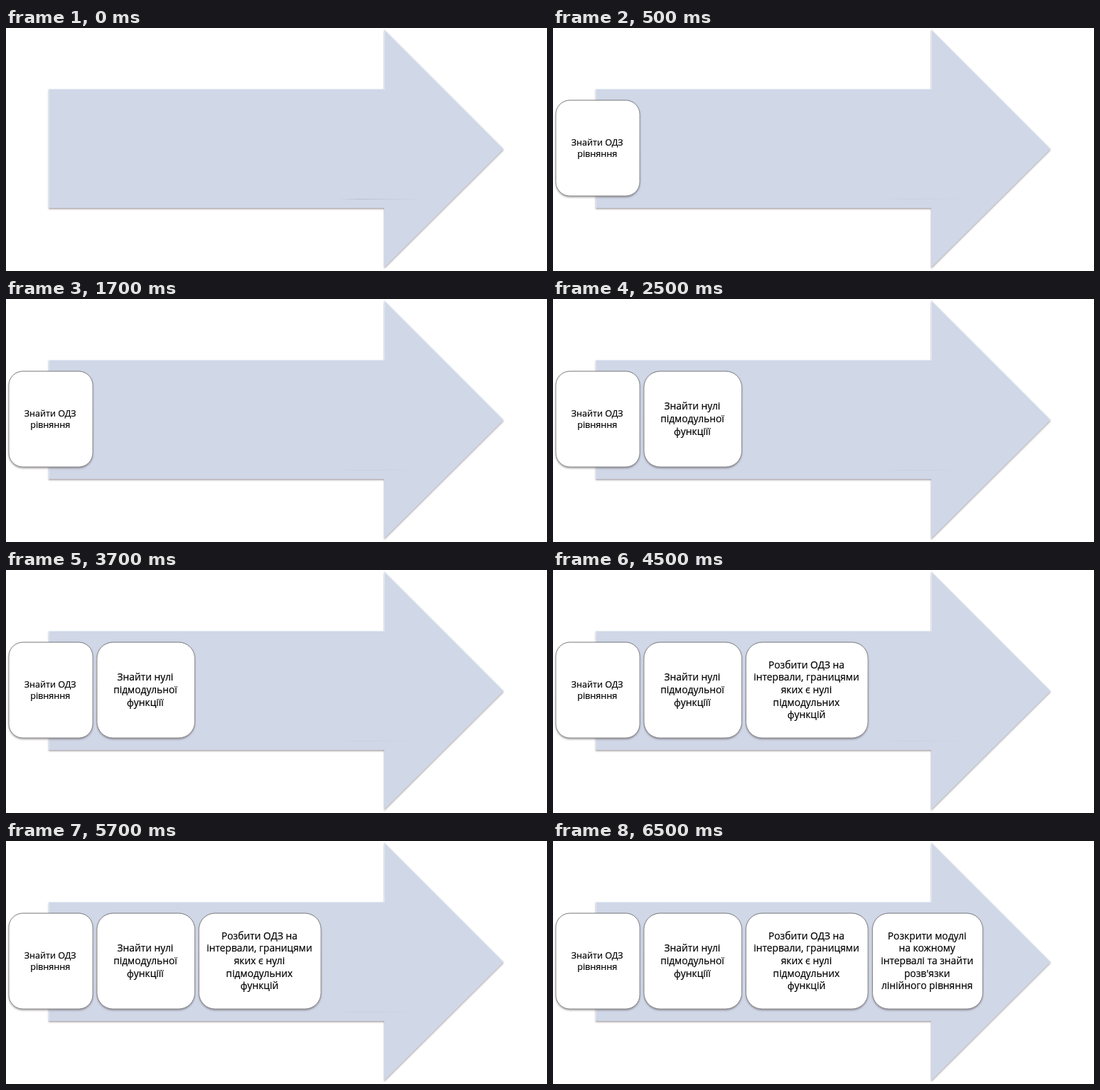
An HTML page that plays this animation: 761x343 px, repeating every 8 s.

```html
<!DOCTYPE html>
<html lang="uk">
<head>
<meta charset="utf-8">
<style>
  html, body { margin: 0; width: 100%; height: 100%; overflow: hidden; background: #fff; }
  svg { display: block; width: 761px; height: 343px; }
  text {
    font-family: "Open Sans", "Noto Sans", sans-serif; text-anchor: middle;
    fill: #000; stroke: #000; stroke-width: .2px;
  }
</style>
</head>
<body>
<svg id="stage" viewBox="0 0 761 343">
  <defs>
    <filter id="soft" x="-10%" y="-10%" width="120%" height="120%">
      <feDropShadow dx="0" dy="1.6" stdDeviation="1" flood-color="#50404c" flood-opacity=".5"/>
    </filter>
    <linearGradient id="rim" x2="0" y2="1">
      <stop stop-color="#6c6c6c"/>
      <stop offset=".2" stop-color="#909090"/>
      <stop offset="1" stop-color="#808080"/>
    </linearGradient>
    <linearGradient id="hair" gradientUnits="userSpaceOnUse" x1="468" x2="586">
      <stop stop-color="#b9bfcc" stop-opacity="0"/>
      <stop offset=".25" stop-color="#b9bfcc"/>
      <stop offset="1" stop-color="#b9bfcc" stop-opacity="0"/>
    </linearGradient>
  </defs>
  <path d="M60 86H532V2L700 170.5L532 338V254H60Z" fill="#d0d7e7" filter="url(#soft)"/>
  <path d="M60.5 253V86.5H532.5V3L699 170" fill="none" stroke="#dde8f1"/>
  <rect id="crease" x="468" y="241" width="118" height="1" fill="url(#hair)"/>
</svg>
<script>
const LOOP = 8000, TOP = 102, HEIGHT = 135;
const stage = document.getElementById("stage");
const crease = document.getElementById("crease");

const cards = [
  { at: 500, x: 4, w: 118, size: 12.6, step: 16.2, lines: ["Знайти ОДЗ", "рівняння"] },
  { at: 2500, x: 128, w: 137.5, lines: ["Знайти нулі", "підмодульної", "функціїї"] },
  { at: 4500, x: 271.5, w: 171.5,
    lines: ["Розбити ОДЗ на", "інтервали, границями", "яких є нулі", "підмодульних", "функцій"] },
  { at: 6500, x: 449.5, w: 155,
    lines: ["Розкрити модулі", "на кожному", "інтервалі та знайти", "розв'язки", "лінійного рівняння"] }
];

function add(parent, tag, attrs) {
  const el = document.createElementNS("http://www.w3.org/2000/svg", tag);
  for (const key in attrs) el.setAttribute(key, attrs[key]);
  return parent.appendChild(el);
}

for (const card of cards) {
  const { x, w, lines, size = 13.8, step = 17.7 } = card;
  card.el = add(stage, "g", {});
  add(card.el, "rect", {
    x, y: TOP, width: w, height: HEIGHT, rx: Math.min(w, HEIGHT) / 6,
    fill: "#fff", stroke: "url(#rim)", "stroke-width": 0.9, filter: "url(#soft)"
  });
  const first = 174 - (lines.length - 1) / 2 * step;
  lines.forEach((line, i) => {
    add(card.el, "text", { x: x + w / 2 - 0.8, y: first + i * step, "font-size": size }).textContent = line;
  });
}

function draw(now) {
  const t = now % LOOP;
  for (const { el, at } of cards) el.style.display = t < at ? "none" : "";
  crease.style.opacity = t < 500 ? 1 : t < 6500 ? 0.35 : 0;
  requestAnimationFrame(draw);
}
draw(performance.now());
</script>
</body>
</html>
```
